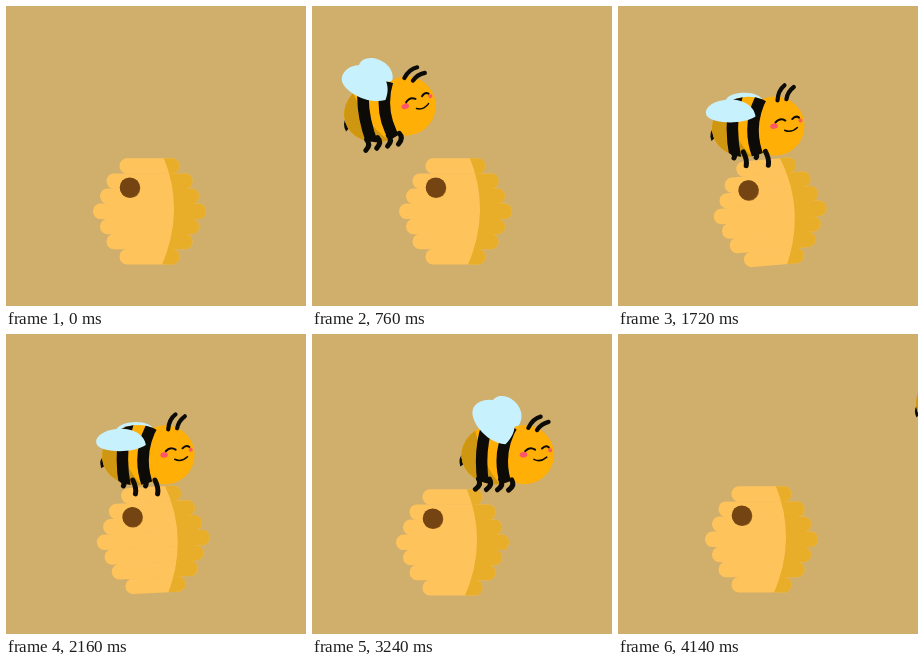
An HTML page that plays this animation: 300 by 300 pixels, repeating every 4.16 s.

```html
<!DOCTYPE html>
<html lang="en">
<head>
<meta charset="utf-8">
<title>Bee and hive</title>
<style>
  html, body { margin: 0; width: 100%; height: 100%; overflow: hidden; background: #d0ae6b; }
  svg { display: block; width: 100%; height: 100%; }
  .line { fill: none; stroke: #0c0b08; stroke-linecap: round; }
</style>
</head>
<body>
<svg viewBox="0 0 300 300">
  <defs>
    <g id="comb"></g>
    <clipPath id="shade"><path d="M157 150Q180 205 155 261H210V150Z"/></clipPath>
    <clipPath id="abdomen"><ellipse cx="-28" cy="-3" rx="35" ry="30"/></clipPath>
    <path id="wing" fill="#c8f1fe" d="M0 0C-2 -18 -18 -25 -32 -21C-47 -17 -53 -4 -48 4C-42 13 -14 14 0 0Z"/>
  </defs>
  <rect width="300" height="300" fill="#d0ae6b"/>
  <g id="hive">
    <use href="#comb" fill="#ffc35c"/>
    <use href="#comb" fill="#e8ae2a" clip-path="url(#shade)"/>
    <circle cx="124.2" cy="182" r="10.1" fill="#8d5a1d"/>
    <circle cx="123.7" cy="181.4" r="10" fill="#744512"/>
  </g>
  <g id="bee">
    <use id="farWing" href="#wing"/>
    <path d="M-60 -7Q-67 -3 -65 6Q-59 3 -57 -1Z" fill="#0c0b08"/>
    <g clip-path="url(#abdomen)">
      <rect x="-70" y="-40" width="80" height="75" fill="#ffaf05"/>
      <path d="M-70 -40H-48Q-44 12 -22 32H-70Z" fill="#cf9612"/>
    </g>
    <circle r="29.5" fill="#ffaf05"/>
    <g clip-path="url(#abdomen)" class="line" stroke-width="11.5">
      <path d="M-33 -36Q-47 -6 -43 32"/>
      <path d="M-7 -34Q-30 -4 -20 32"/>
    </g>
    <g id="legs" class="line" stroke-width="5"></g>
    <g id="antennae" class="line" stroke-width="4.2">
      <path d="M6 -25Q8 -35 15 -39"/>
      <path d="M15 -25Q17 -32 24 -36"/>
    </g>
    <ellipse cx="-1" cy="0" rx="3.8" ry="2.7" fill="#ff5568"/>
    <circle cx="26" cy="-2" r="2" fill="#ff5568"/>
    <g class="line" stroke-width="2">
      <path d="M1 -3.5Q6 -8 11 -4"/>
      <path d="M18 -4.5Q22 -8 25 -5"/>
      <path d="M9 5.5Q15 9.5 22 4.5" stroke-width="1.5"/>
    </g>
    <use id="nearWing" href="#wing"/>
  </g>
</svg>
<script>
const LOOP = 4160, FLAP = 424, WINGS_UP = 3240;
const el = id => document.getElementById(id);
const mix = (a, b, k) => a + (b - a) * k;
const progress = (t, from, to) => Math.min(1, Math.max(0, (t - from) / (to - from)));
const easeOut = u => u * (2 - u);
const smooth = (t, from, to) => {
  const u = progress(t, from, to);
  return u * u * (3 - 2 * u);
};

function add(parent, name, attrs) {
  const node = document.createElementNS("http://www.w3.org/2000/svg", name);
  for (const key in attrs) node.setAttribute(key, attrs[key]);
  return parent.appendChild(node);
}

function place(id, x, y, angle, extra = "") {
  el(id).setAttribute("transform", `translate(${x} ${y}) rotate(${angle}) ${extra}`);
}

// Stacked rounded rows, widest in the middle.
for (let row = -3; row <= 3; row++) {
  const half = [56.5, 49.5, 43, 30][Math.abs(row)];
  add(el("comb"), "rect", {
    x: 143.5 - half, y: 197.6 + row * 15.1, width: half * 2, height: 15.5, rx: 7.5
  });
}

const legs = Array.from({ length: 4 }, () => add(el("legs"), "path", {}));

// One sway right and back left under the bee's weight, then a small recoil.
function drawHive(t) {
  const u = progress(t, 1450, 3090);
  const sway = Math.sin(2 * Math.PI * u);
  const recoil = 3 * Math.sin(Math.PI * progress(t, 3060, 3420));
  const tilt = -mix(5, 9, u) * sway;
  const dx = mix(10.4, 7.8, u) * sway - recoil;
  const dy = recoil + Math.abs(tilt) * .2;
  place("hive", 143.5 + dx, 205.5 + dy, tilt, "translate(-143.5 -205.5)");
  return tilt;
}

function drawLegs(perched) {
  legs.forEach((leg, i) => {
    const far = i % 2 === 0;
    const x = -48 + 11 * i + 2 * perched, y = 20 + 1.3 * i;
    const foot = mix(-4, 1, perched), drop = mix(10, far ? 6 : 14, perched);
    leg.setAttribute("d", `M${x} ${y}q3 ${drop * .6} ${foot} ${drop}`);
  });
}

function drawBee(t, tilt) {
  const enter = easeOut(progress(t, 60, 1200));
  const rear = smooth(t, 500, 1060);
  const land = smooth(t, 1200, 1500);
  const settle = smooth(t, 1720, 2700);
  const leave = smooth(t, 2800, 4140);
  const climb = smooth(t, 3150, 4140);
  const perched = land - smooth(t, 2850, 3200);

  const x = -48 + 167 * enter + 38 * land + 5 * settle + 199 * leave;
  const y = 100 + 20 * land + 2 * settle - 57 * climb;
  const angle = -6 - 26 * rear + 27 * land + .6 * tilt - 6 * climb;
  place("bee", x, y, angle);

  const droop = (1 - perched) * (14 - 1.2 * angle);
  el("antennae").setAttribute("transform", `rotate(${droop} 10 -25)`);

  const up = .5 + .5 * Math.cos(2 * Math.PI * (t - WINGS_UP) / FLAP);
  place("nearWing", -18, -12, 8 + 50 * up, `scale(1 ${mix(.68, 1.08, up)})`);
  place("farWing", -8, -25, 5 + 58 * up, `scale(.76 ${mix(.4, .75, up)})`);
  drawLegs(perched);
}

const start = performance.now();
function tick() {
  const t = (performance.now() - start) % LOOP;
  drawBee(t, drawHive(t));
  requestAnimationFrame(tick);
}
tick();
</script>
</body>
</html>
```
